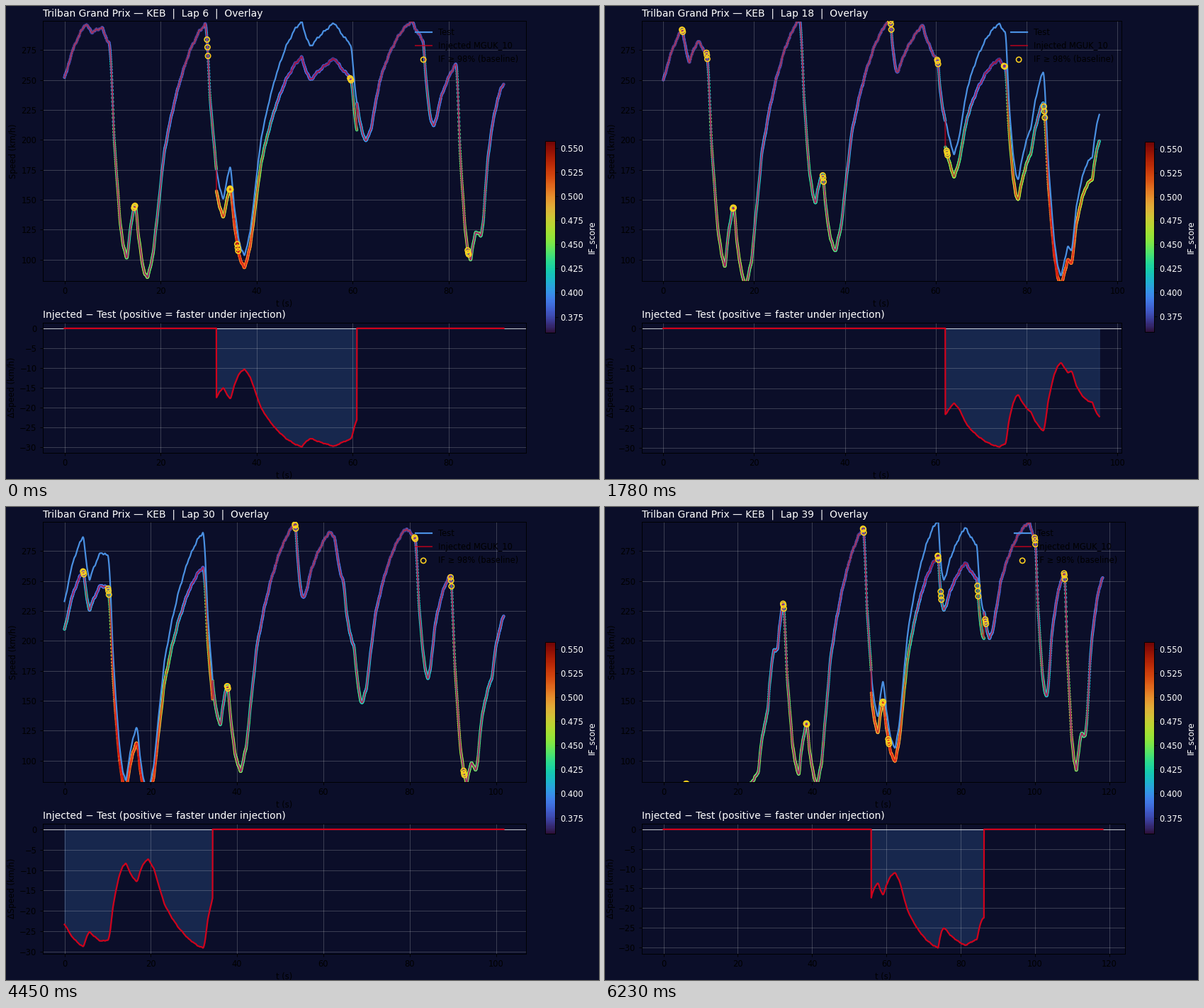
A matplotlib script that plays this animation: 837x669 px, repeating every 7120 ms.

```python
import numpy as np
import matplotlib.pyplot as plt
from matplotlib.animation import FuncAnimation
from matplotlib.cm import ScalarMappable
from matplotlib.colors import Normalize

W, H, DPI = 837, 669, 64
BG, BLUE, RED, GOLD = "#0b0e29", "#4a90e2", "#d0021b", "#ffd21f"
EVENT = "Trilban Grand Prix — KEB"
NORM = Normalize(0.3585, 0.5573)

# Share of a speed change reached after a share of its time.
RISE = ([0, .1, .17, .29, .42, .55, .72, .89, 1],
        [0, .1, .25, .5, .65, .77, .89, .97, 1])
FALL = ([0, .08, .17, .25, .4, .6, .8, 1],
        [0, .08, .25, .42, .6, .82, .94, 1])


def px(v):
    """Pixels to points."""
    return v * 72 / DPI


plt.rcParams.update({
    "font.family": "DejaVu Sans", "font.size": px(11.53),
    "axes.titlesize": px(13.83), "axes.titlepad": px(6.9),
    "axes.labelpad": px(4.6), "axes.linewidth": px(0.92),
    "axes.facecolor": BG, "grid.linewidth": px(0.92),
    "xtick.major.size": px(4), "ytick.major.size": px(4),
    "xtick.major.pad": px(4), "ytick.major.pad": px(4),
    "xtick.major.width": px(0.92), "ytick.major.width": px(0.92),
})


def speed_trace(corners, t):
    """Join peaks and corners by acceleration and braking curves."""
    v = np.empty_like(t)
    for (t0, v0), (t1, v1) in zip(corners, corners[1:]):
        part = (t >= t0) & (t <= t1)
        u = (t[part] - t0) / (t1 - t0)
        shape, full = (RISE, 90) if v1 > v0 else (FALL, 60)
        mix = min(abs(v1 - v0) / full, 1)
        v[part] = v0 + (v1 - v0) * (mix * np.interp(u, *shape) + (1 - mix) * u)
    n = int(0.15 / t[1])
    return np.convolve(np.pad(v, n, "edge"), np.ones(2 * n + 1) / (2 * n + 1), "valid")


class Lap:
    """Speed over one lap, slowed by 10 % inside a time window."""

    def __init__(self, number, window, rings, corners, gain=1.0, narrow=False):
        self.number, self.narrow = number, narrow
        self.rings, self.corners = rings, corners
        t = self.t = np.linspace(0, corners[-1][0], 3000)
        ripple = 0.6 * np.sin(4.1 * t) + 0.4 * np.sin(9.7 * t + number)
        self.test = gain * speed_trace(corners, t) + ripple
        inside = (t >= window[0]) & (t <= window[1])
        self.delta = np.where(inside, -0.1 * self.test, 0)
        self.injected = self.test + self.delta
        slow = np.clip((270 - self.injected) / 170, 0, 1)
        brake = np.clip(-np.gradient(self.test, t) / 60, 0, 1)
        noise = np.random.default_rng(number).normal(0, 0.006, t.size)
        self.score = 0.367 + slow * (0.08 + 0.06 * inside) + 0.04 * brake + noise

    def ring_points(self):
        q = np.add.outer(self.rings, [-.1, 0, .1]).ravel()
        return q, np.interp(q, self.t, self.injected)


lap6 = Lap(
    6, (31.65, 60.9), [14.6, 29.8, 34.5, 36.1, 59.6, 84.1],
    [(0, 252), (4.4, 297), (5.8, 290), (7.8, 294), (9.4, 280), (13, 100),
     (14.75, 147), (17.3, 84), (29.4, 297), (33.1, 150), (34.55, 178),
     (37.5, 103), (49.4, 299), (51.2, 278), (56.2, 298), (59.6, 280),
     (62.9, 199), (72.4, 299), (74.7, 283), (76.9, 211), (81.6, 264),
     (84.6, 98), (85.6, 123), (86.8, 120), (91.5, 247)])

lap8 = Lap(
    8, (0, 31.45), [30.1, 34.4, 36.4, 59.75, 61.5, 74.7, 84.3],
    [(0, 252), (4.5, 296), (6, 288), (7.5, 292), (9.8, 270), (13.1, 99),
     (14.9, 144), (17.7, 84), (29.8, 298), (33.2, 147), (34.4, 175),
     (37.5, 100), (49.2, 299), (51.2, 278), (56.6, 298), (59.7, 279),
     (63, 203), (72.6, 299), (74.8, 288), (76.9, 206), (80.3, 262),
     (81.7, 262), (84.8, 97), (85.8, 124), (87.1, 117), (91.9, 249)])

lap18 = Lap(
    18, (62.1, 97), [4.2, 9.6, 15.4, 35.2, 50.1, 60.4, 62.5, 75.1, 83.9, 87.4],
    [(0, 250), (4.2, 293), (5.7, 265), (7.65, 283), (9.6, 272), (13.6, 94),
     (15.45, 145), (18.3, 78), (30.1, 301), (33.5, 147), (35, 173),
     (37.9, 107), (50, 301), (51.4, 256), (57, 296), (60.4, 266),
     (62.3, 214), (64, 188), (73.9, 297), (75.3, 290), (78.1, 166),
     (80.9, 210), (83.7, 258), (87.6, 85), (89.1, 111), (89.8, 107),
     (93.5, 182), (94.4, 185), (96, 222)], narrow=True)

lap28 = Lap(
    28, (34, 66.6),
    [4.5, 10.1, 16.4, 31.9, 33.95, 52.9, 62.9, 64.8, 80.8, 88.7, 91.7, 93.9],
    [(0, 236), (4.4, 288), (5.8, 254), (8, 273), (10.2, 271), (14.2, 84),
     (16.45, 138), (19.2, 79), (31.9, 292), (35.7, 124), (37.1, 152),
     (40.7, 94), (53.1, 299), (55.2, 220), (61, 289), (62.5, 286),
     (63.8, 246), (64.7, 246), (67, 200), (68.5, 162), (79.3, 299),
     (80.7, 290), (83.8, 172), (88.8, 256), (93, 82), (94, 107), (95.1, 94),
     (98.4, 179), (101, 231)])

lap30 = Lap(
    30, (0, 34.35), [4.4, 10.2, 37.8, 53.5, 81.2, 89.6, 92.6],
    [(0, 233), (4.4, 288), (5.8, 251), (8.4, 274), (10.2, 271), (14.2, 82),
     (16.75, 129), (19.4, 73), (32.2, 291), (36.1, 129), (37.75, 164),
     (40.9, 91), (53.5, 298), (55.4, 235), (61.4, 291), (62.6, 287),
     (64.6, 250), (67.1, 196), (69, 147), (79.3, 294), (81.3, 286),
     (84.3, 168), (89.5, 255), (93.2, 81), (94.4, 99), (95.4, 91),
     (98.9, 167), (101.8, 221)])

lap39 = Lap(
    39, (55.9, 86.25),
    [6.1, 32.3, 38.5, 53.8, 59, 60.6, 73.9, 74.7, 84.6, 86.7, 100, 107.9],
    [(0, 60), (6.1, 81), (20, 60), (25.4, 89), (28, 140), (29.7, 192),
     (30.7, 193), (32.2, 233), (36.4, 88), (38.5, 132), (41.4, 79),
     (53.8, 294), (57.7, 136), (59.1, 167), (62.3, 110), (73.9, 301),
     (75.4, 250), (81.2, 295), (84.3, 280), (86.4, 222), (87.7, 201),
     (98.4, 299), (100, 285), (103.1, 152), (107.9, 257), (111.1, 91),
     (112.5, 123), (113.5, 120), (118.2, 253)])

lap23 = Lap(23, (0, 31.6), lap18.rings, lap18.corners, gain=0.987, narrow=True)
lap34 = Lap(34, (66.5, 103), lap30.rings, lap30.corners, gain=1.01)
LAPS = [lap6, lap8, lap18, lap23, lap28, lap30, lap34, lap39]


def box(left, top, right, bottom):
    return [left / W, 1 - bottom / H, (right - left) / W, (bottom - top) / H]


fig = plt.figure(figsize=(W / DPI, H / DPI), dpi=DPI, facecolor=BG)
top_ax = fig.add_axes(box(51.5, 21, 733.5, 389))
low_ax = fig.add_axes(box(51.5, 447.5, 733.5, 632))
bar_ax = fig.add_axes(box(760.5, 191, 774.5, 462))

bar = fig.colorbar(ScalarMappable(NORM, "turbo"), cax=bar_ax, alpha=0.9,
                   ticks=np.arange(0.375, 0.56, 0.025))
bar.set_label("IF_score", color="white")
bar.ax.tick_params(labelcolor="white")


def style(ax, title, ylabel, yticks, span):
    ax.set_title(title, loc="left", color="white")
    ax.set_xlabel("t (s)")
    ax.set_ylabel(ylabel)
    ax.set_xticks(np.arange(0, 1.05 * span, 20))
    ax.set_yticks(yticks)
    ax.set_xlim(-0.05 * span, 1.05 * span)
    ax.grid(color="white", alpha=0.21)


def draw(i):
    lap = LAPS[i]
    t, span = lap.t, lap.t[-1]
    right, inset = (728.5, 1) if lap.narrow else (733.5, 0)
    top_ax.set_position(box(51.5, 21, right, 389))
    low_ax.set_position(box(51.5, 447.5, right, 632))
    bar_ax.set_position(box(760.5 + inset, 191 + inset, 774.5, 462 - inset))

    top_ax.clear()
    top_ax.scatter(t, lap.injected, s=px(4.2) ** 2, c=lap.score, cmap="turbo",
                   norm=NORM, alpha=0.9, linewidths=0)
    top_ax.plot(t, lap.test, color=BLUE, lw=px(2.2), label="Test")
    top_ax.plot(t, lap.injected, color=RED, lw=px(1.9), alpha=0.7,
                label="Injected MGUK_10")
    top_ax.scatter(*lap.ring_points(), s=px(7.3) ** 2, facecolors="none",
                   edgecolors=GOLD, linewidths=px(1.6), zorder=3,
                   label="IF ≥ 98% (baseline)")
    style(top_ax, f"{EVENT}  |  Lap {lap.number}  |  Overlay", "Speed (km/h)",
          np.arange(100, 276, 25), span)
    top_ax.set_ylim(82, 299.5)
    top_ax.legend(loc="upper right", frameon=False)

    low_ax.clear()
    low_ax.fill_between(t, lap.delta, 0, color=BLUE, alpha=0.2)
    low_ax.axhline(0, color="white", lw=px(1.1), alpha=0.7)
    low_ax.plot(t, lap.delta, color=RED, lw=px(2.2))
    style(low_ax, "Injected − Test (positive = faster under injection)",
          "ΔSpeed (km/h)", np.arange(-30, 1, 5), span)
    depth = -lap.delta.min()
    low_ax.set_ylim(-1.05 * depth, 0.05 * depth)


anim = FuncAnimation(fig, draw, frames=len(LAPS), init_func=lambda: None,
                     interval=890, repeat=True, repeat_delay=0)
plt.show()
```
